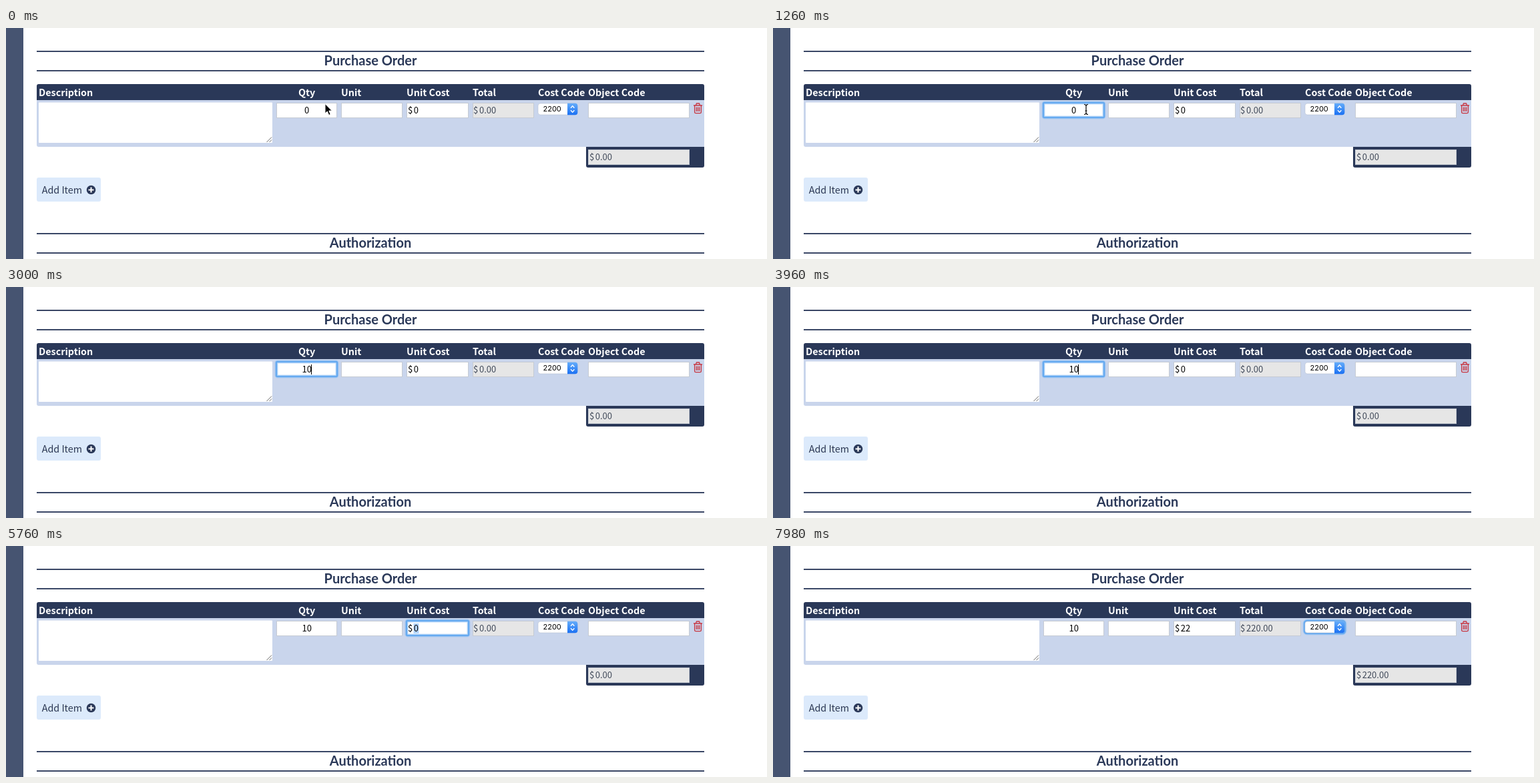
An HTML page that plays this animation: 1140x346 px, repeating every 8000 ms.

```html
<!DOCTYPE html>
<html lang="en">
<head>
<meta charset="utf-8">
<title>Purchase Order</title>
<style>
html, body { margin: 0; width: 100%; height: 100%; overflow: hidden; background: #fff; }
svg { display: block; }
text { font: 13px "Noto Sans CJK JP", "Noto Sans CJK SC", "Noto Sans CJK", "Noto Sans", sans-serif; white-space: pre; }
.title { font: bold 20px Lato, sans-serif; fill: #2a3858; text-anchor: middle; }
.head { font-size: 14.33px; font-weight: bold; fill: #fff; }
.label { font-size: 14.33px; fill: #2c3853; }
.pick { font: 11px Inter, sans-serif; }
.muted { fill: #3f4858; }
</style>
</head>
<body>
<svg id="stage" width="1140" height="346" viewBox="0 0 1140 346">
  <defs>
    <linearGradient id="blue" x2="0" y2="1">
      <stop stop-color="#65adfa"/><stop offset="1" stop-color="#1a70f3"/>
    </linearGradient>
  </defs>
  <rect width="26" height="346" fill="#465471"/>
  <path d="M46 35H1046M46 64H1046M46 308H1046M46 337H1046" stroke="#3a4766" stroke-width="2"/>
  <text class="title" x="546" y="56">Purchase Order</text>
  <text class="title" x="546" y="329">Authorization</text>

  <path d="M46 108V87q0-3 3-3H1043q3 0 3 3V108z" fill="#2a3858"/>
  <path d="M46 108H1046V178H49q-3 0-3-3z" fill="#c9d5ec"/>
  <path d="M869 178H1046V206q0 3-3 3H872q-3 0-3-3z" fill="#2a3858"/>
  <g id="heads"></g>
  <rect x="49" y="111.5" width="350" height="60.5" rx="1" fill="#fff"/>
  <path d="M390.5 171l7.500-7.500M394.500 171l3.500-3.500" stroke="#666" stroke-width="1"/>
  <g id="fields"></g>

  <g id="focus" fill="none">
    <rect id="halo" stroke="#8fc0f5" stroke-opacity=".55" stroke-width="5" rx="2"/>
    <rect id="ring" stroke="#66aaf0" stroke-width="2.500" rx="1.500"/>
  </g>
  <g>
    <rect x="797" y="113" width="59" height="17" rx="3.500" fill="#fff" stroke="#b5bfd0" stroke-width=".6"/>
    <path d="M841 112.700H852.500q3.800 0 3.800 3.800V126.500q0 3.800-3.800 3.800H841z" fill="url(#blue)"/>
    <path d="M846 119.800l2.700-3 2.700 3M846 123.200l2.700 3 2.700-3" fill="none" stroke="#fff" stroke-width="1.400"/>
    <text class="pick" x="804.500" y="125">2200</text>
  </g>
  <g fill="none" stroke="#c8353f" stroke-width="1.300">
    <path d="M1030 116H1043M1033.500 115.500l1-2.500h4l1 2.500M1031.600 116.500V126q0 1.700 1.700 1.700h6.400q1.700 0 1.700-1.700V116.500M1034.300 118.500v6.500M1036.500 118.500v6.500M1038.700 118.500v6.500"/>
  </g>

  <rect id="selection" x="610.500" y="116" width="8" height="15" fill="#b3d5fd"/>
  <text id="qty" x="450.700" y="128" text-anchor="middle"></text>
  <text x="602" y="128">$</text><text id="cost" x="610.700" y="128"></text>
  <g class="muted">
    <text x="700" y="128">$</text><text id="total" x="709" y="128"></text>
    <text x="874" y="198">$</text><text id="sum" x="882.700" y="198"></text>
  </g>
  <path id="caret" d="M0 116V131" stroke="#000"/>

  <rect x="46" y="224" width="96" height="36" rx="3" fill="#dceafb"/>
  <text class="label" x="53.700" y="248">Add Item</text>
  <circle cx="127.500" cy="242.500" r="6.800" fill="#2a3858"/>
  <path d="M123.500 242.500h8M127.500 238.500v8" stroke="#fff" stroke-width="2"/>

  <g id="click">
    <circle cx="469" cy="122" r="16.500" fill="#fff"/>
    <circle cx="469" cy="122" r="14.700" fill="none" stroke="#000" stroke-width="3"/>
  </g>
  <path id="arrow" d="M0 0V14.500l3.300-3.100 2.400 5.600 2.500-1.100-2.400-5.400h4.600z" stroke="#fff" stroke-width="1"/>
  <path id="beam" d="M-3-7.500q3 0 3 2.500 0-2.500 3-2.500M0-5V5M-3 7.500q3 0 3-2.500 0 2.500 3 2.500M-1.500 2h3" fill="none" stroke="#000" stroke-width="1.200"/>
</svg>
<script>
const $ = id => document.getElementById(id);
const LOOP = 8000;

const heads = [[49, "Description"], [438, "Qty"], [502, "Unit"], [600, "Unit Cost"],
  [699, "Total"], [797, "Cost Code"], [872, "Object Code"]];
$("heads").innerHTML = heads.map(([x, s]) => `<text class="head" x="${x}" y="102">${s}</text>`).join("");

const fields = [[405, 112, 90], [502, 112, 91], [600, 112, 92], [699, 112, 91, 1],
  [872, 112, 151], [872, 182, 151, 1]];
$("fields").innerHTML = fields.map(([x, y, w, off]) =>
  `<rect x="${x + .5}" y="${y + .5}" width="${w}" height="22" fill="${off ? "#e6e6e6" : "#fff"}" stroke="#c6cbd3"/>`).join("");

// Each step: start time, focused box [x, y, w, h], caret x, quantity, cost
const QTY = [405, 112, 91, 22], UNIT = [502, 112, 92, 22],
  COST = [600, 112, 93, 22], PICK = [796, 112, 61, 19];
const steps = [
  [0, null, null, "0", "0"],
  [540, QTY, 454.5, "0", "0"],
  [2160, QTY, 450.5, "", "0"],
  [2400, QTY, 454.5, "1", "0"],
  [2640, QTY, 457.5, "10", "0"],
  [4300, UNIT, 505.5, "10", "0"],
  [5500, COST, null, "10", "0"],
  [6120, COST, 618.5, "10", "2"],
  [6360, COST, 625.5, "10", "22"],
  [7400, PICK, null, "10", "22"]
];

const show = (id, on) => $(id).setAttribute("display", on ? "inline" : "none");
const move = (id, x, y) => $(id).setAttribute("transform", `translate(${x} ${y})`);
const write = (id, s) => $(id).textContent = s;

function box(id, [x, y, w, h]) {
  Object.entries({ x, y, width: w, height: h }).forEach(([k, v]) => $(id).setAttribute(k, v));
}

function draw(t) {
  const [start, target, caret, qty, cost] = steps.filter(s => s[0] <= t).pop();
  write("qty", qty);
  write("cost", cost);
  const total = target === PICK ? "220.00" : "0.00";
  write("total", total);
  write("sum", total);

  show("focus", target);
  if (target) {
    box("halo", target);
    box("ring", target);
    $("ring").setAttribute("rx", target === PICK ? 4 : 1.5);
    $("halo").setAttribute("rx", target === PICK ? 4 : 2);
  }
  show("selection", target === COST && caret === null);
  show("caret", caret !== null && (t - start) % 1060 < 530);
  move("caret", caret || 0, 0);

  const p = Math.min(t / 400, 1), ease = p * p * (3 - 2 * p);
  const x = 478 - 9 * ease, y = 113.5 + 8.5 * ease;
  move("arrow", x, y);
  move("beam", x, y);
  show("arrow", t < 150);
  show("beam", t >= 150 && t < 2160);
  show("click", t >= 480 && t < 840);
}

const began = performance.now();
function tick() {
  draw((performance.now() - began) % LOOP);
  requestAnimationFrame(tick);
}
tick();
</script>
</body>
</html>
```
